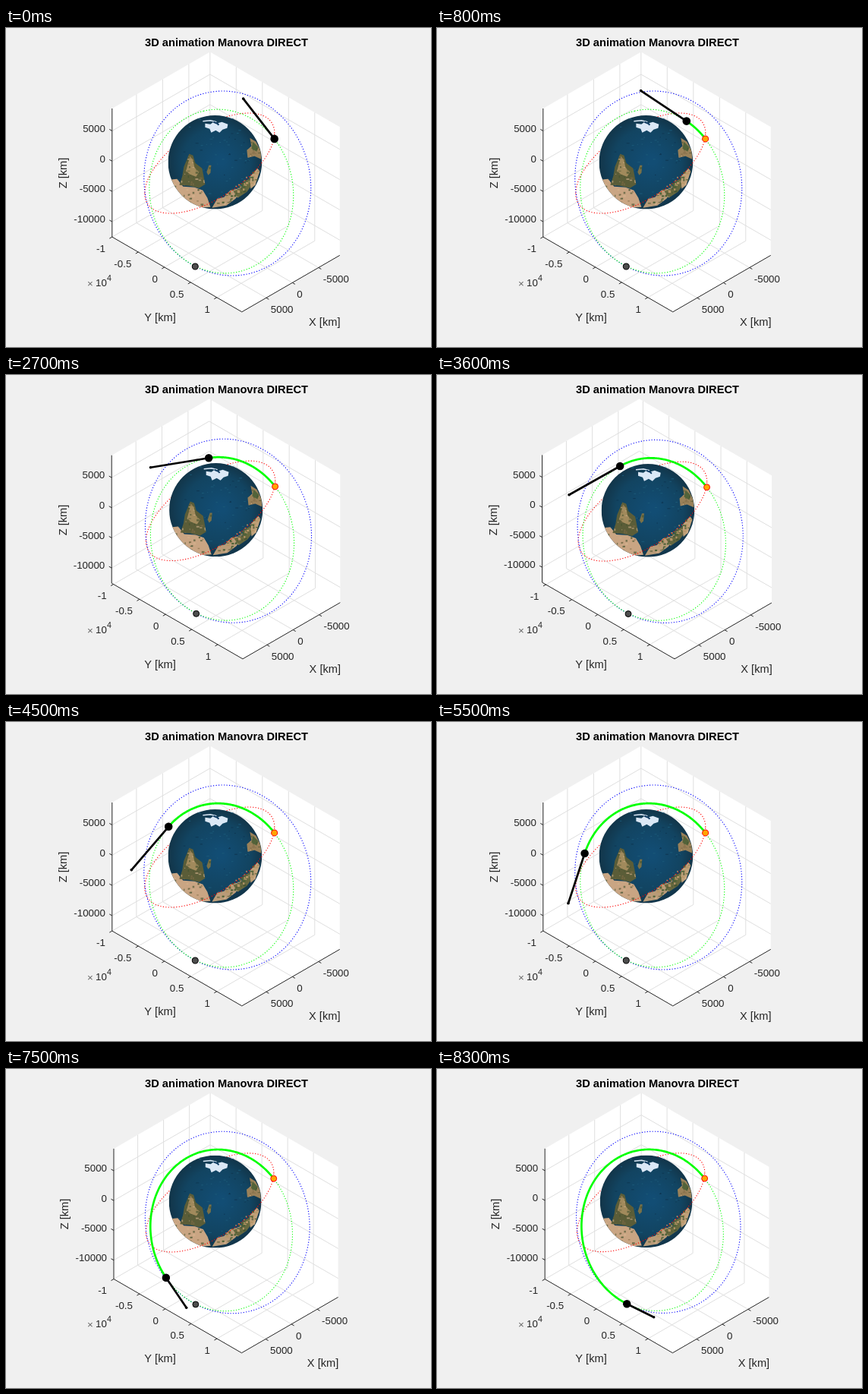
Animation, 560 px wide and 420 px high, one loop 8400 ms. Source, as an HTML page with a canvas:

```html
<!DOCTYPE html>
<html lang="en">
<head>
<meta charset="utf-8">
<title>Orbit transfer</title>
<style>
html, body { margin: 0; width: 100%; height: 100%; overflow: hidden; background: #f0f0f0; }
canvas { display: block; }
</style>
</head>
<body>
<canvas id="stage" width="560" height="420"></canvas>
<script>
const ctx = document.getElementById('stage').getContext('2d');
const TAU = Math.PI * 2, SQ2 = Math.SQRT2, SQ3 = Math.sqrt(3), SQ6 = Math.sqrt(6);
const STEPS = 84, STEP_MS = 100;
const BASE_K = 19.915;          // pixels per 5000 km along an isometric ground axis, vertically
const UNIT = BASE_K * SQ6;      // pixels per 5000 km at true length
const FONT = '"Liberation Sans", Arial, sans-serif';
const INK = '#262626';
const BOX = { x: [-1.81, 1.93], y: [-2, 2.956], z: [-2.505, 1.741] };

// Transfer orbit: screen pixels plus depth toward the viewer, Earth at the origin.
const ECC = 0.362, CENTER = [8.4, 38.3, 1.1];
const U = [-23.2, -105.8, -3], V = [-92.1, 21.2, -35.6];
const orbitPoint = E => U.map((u, i) => CENTER[i] + u * Math.cos(E) + V[i] * Math.sin(E));
const velocity = E => U.map((u, i) =>
  0.527 * (V[i] * Math.cos(E) - u * Math.sin(E)) / (1 - ECC * Math.cos(E)));
function anomaly(step) {
  const theta = (-82 + step * 2.861) * Math.PI / 180;
  return 2 * Math.atan(Math.sqrt((1 - ECC) / (1 + ECC)) * Math.tan(theta / 2));
}
function toSpace([sx, sy, d]) {
  return {
    x: (-sx / SQ2 + sy / SQ6 + d / SQ3) / UNIT,
    y: (sx / SQ2 + sy / SQ6 + d / SQ3) / UNIT,
    z: (-2 * sy / SQ6 + d / SQ3) / UNIT
  };
}

// Fit the isometric box into the plot area, growing it when the arrow leaves it.
function fitView(tip) {
  const box = {};
  for (const a of 'xyz') box[a] = [Math.min(BOX[a][0], tip[a]), Math.max(BOX[a][1], tip[a])];
  const { x, y, z } = box;
  const k = 342.3 / (x[1] - x[0] + y[1] - y[0] + 2 * (z[1] - z[0]));
  const ox = 289.8 - k * SQ3 * (y[0] + y[1] - x[0] - x[1]) / 2;
  const oy = 31.5 - k * (x[0] + y[0] - 2 * z[1]);
  const at = (px, py, pz) => [ox + k * SQ3 * (py - px), oy + k * (px + py - 2 * pz)];
  return { x, y, z, ox, oy, at, scale: k / BASE_K };
}

function path(points, close) {
  ctx.beginPath();
  points.forEach(p => ctx.lineTo(p[0], p[1]));
  if (close) ctx.closePath();
}
function line(color, width, ...points) {
  path(points);
  ctx.strokeStyle = color;
  ctx.lineWidth = width;
  ctx.stroke();
}
function dot([x, y], r, fill, edge) {
  ctx.beginPath();
  ctx.arc(x, y, r, 0, TAU);
  ctx.fillStyle = fill;
  ctx.fill();
  if (edge) { ctx.strokeStyle = edge; ctx.lineWidth = 1; ctx.stroke(); }
}
function text(str, x, y, align = 'center', size = 13.33, weight = '', color = INK) {
  ctx.font = `${weight} ${size}px ${FONT}`;
  ctx.textAlign = align;
  ctx.textBaseline = 'alphabetic';
  ctx.fillStyle = color;
  ctx.fillText(str, x, y + size * 0.36);
}

function drawAxes({ x, y, z, at }) {
  const [x0, x1] = x, [y0, y1] = y, [z0, z1] = z;
  const grid = '#dfdfdf';
  const left = at(x1, y0, z0), front = at(x1, y1, z0), right = at(x0, y1, z0);
  path([left, front, right, at(x0, y1, z1), at(x0, y0, z1), at(x1, y0, z1)], true);
  ctx.fillStyle = '#fff';
  ctx.fill();
  for (const t of [-1, 0, 1]) line(grid, 1, at(t, y1, z0), at(t, y0, z0), at(t, y0, z1));
  for (const t of [-2, -1, 0, 1, 2]) line(grid, 1, at(x1, t, z0), at(x0, t, z0), at(x0, t, z1));
  for (const t of [-2, -1, 0, 1]) line(grid, 1, at(x1, y0, t), at(x0, y0, t), at(x0, y1, t));
  line(INK, 1, at(x1, y0, z1), left, front, right);

  const tick = ([px, py], dx, dy) => line(INK, 1, [px, py], [px + dx, py + dy]);
  for (const t of [-1, 0, 1]) {
    const p = at(t, y1, z0);
    tick(p, 3.5, 2);
    text(String(t * 5000), p[0] + 6, p[1] + 15, 'left');
  }
  for (const t of [-2, -1, 0, 1, 2]) {
    const p = at(x1, t, z0);
    tick(p, -3.5, 2);
    text(String(t / 2), p[0] - 9, p[1] + 15, 'right');
  }
  for (const t of [-2, -1, 0, 1]) {
    const p = at(x1, y0, t);
    tick(p, -3.5, -2);
    text(String(t * 5000), p[0] - 9, p[1] - 3.5, 'right');
  }
  text('×', 107, 336, 'left', 13.33, '', '#666');
  text('10', 118, 335, 'left');
  text('4', 133, 329, 'left', 10.7);
  text('Y [km]', 203, 381, 'center', 14.67);
  text('X [km]', right[0] - 20, 387, 'center', 14.67);
  ctx.save();
  ctx.translate(left[0] - 65, 191);
  ctx.rotate(-Math.PI / 2);
  text('Z [km]', 0, 0, 'center', 14.67);
  ctx.restore();
  text('3D animation Manovra DIRECT', 290.5, 19, 'center', 14.67, 'bold', '#000');
}

// Land outlines, relative to the centre of the globe.
const LAND = [
  ['#c9a583', '-60,23 -50,22 -42,32 -27,33 -16,37 -10,47 -6,59 -22,60 -42,48 -54,36'],
  ['#5b5d38', '-34,-11 -29,-9 -26,1 -17,8 -15,18 -13,29 -21,34 -34,31 -47,30 -43,18 -41,6'],
  ['#a18a5c', '-33,-8 -29,-3 -27,7 -21,13 -25,19 -33,16 -38,11'],
  ['#7a7148', '-8,4 -5,4 -6,14 -9,17 -11,13'],
  ['#9a8159', '46,-32 54,-27 60,-15 61,-4 52,-8 43,-6 42,-16 48,-21'],
  ['#53633a', '50,-27 57,-20 55,-14 48,-18'],
  ['#b99b78', '-4,60 3,48 12,46 20,37 29,35 33,40 27,48 15,57'],
  ['#66683f', '24,38 35,34 39,25 45,22 50,28 42,39 30,47'],
  ['#c0a17a', '46,19 56,8 59,12 53,30 47,35']
].map(([color, pts]) => [color, pts.split(' ').map(p => p.split(',').map(Number))]);
const ICE = '-13,-51 -6,-50 -2,-53 2,-51 9,-53 17,-50 16,-45 10,-43 6,-39 1,-42 -5,-39 -7,-44 -13,-46'
  .split(' ').map(p => p.split(',').map(Number));

function makeRandom(seed) {
  return () => (seed = (seed * 16807) % 2147483647) / 2147483647;
}

function drawEarth() {
  const R = 61.8, rnd = makeRandom(77);
  ctx.save();
  ctx.beginPath();
  ctx.arc(0, 0, R, 0, TAU);
  ctx.clip();
  const sea = ctx.createRadialGradient(8, -2, 5, 0, 0, R);
  sea.addColorStop(0, '#124d74');
  sea.addColorStop(0.7, '#124461');
  sea.addColorStop(1, '#123549');
  ctx.fillStyle = sea;
  ctx.fillRect(-R, -R, 2 * R, 2 * R);
  for (let i = 0; i < 90; i++) {
    ctx.fillStyle = i % 3 ? '#1b5978' : '#0e3652';
    ctx.fillRect((rnd() - 0.5) * 120, (rnd() - 0.5) * 120, 1 + rnd() * 3, 1);
  }
  for (const [color, points] of LAND) {
    path(points, true);
    ctx.fillStyle = color;
    ctx.fill();
    // Mottled terrain inside each outline
    ctx.save();
    ctx.clip();
    const [cx, cy] = points[0];
    for (let i = 0; i < 110; i++) {
      ctx.fillStyle = ['#3f512d', '#d8b58f', '#826d48'][i % 3];
      ctx.globalAlpha = 0.6;
      ctx.fillRect(cx + (rnd() - 0.4) * 70, cy + (rnd() - 0.3) * 60, 1 + rnd() * 3, 1 + rnd() * 2);
    }
    ctx.restore();
  }
  for (let i = 0; i < 45; i++) {
    const f = rnd();
    ctx.fillStyle = i % 2 ? '#b89769' : '#4f6238';
    ctx.fillRect(8 + 46 * f + rnd() * 5, 49 - 36 * f + (rnd() - 0.5) * 12, 1 + rnd() * 3, 1 + rnd() * 2);
  }
  path(ICE, true);
  ctx.fillStyle = '#dbe8f6';
  ctx.fill();
  line('#dbe8f6', 1.5, [-16, -54], [-6, -55], [2, -53]);
  line('#0f3c63', 2, [-2, -53], [3, -51], [5, -49]);
  ctx.restore();
}

function dotted(color, points) {
  ctx.setLineDash([1.2, 2.3]);
  line(color, 1.1, ...points);
  ctx.setLineDash([]);
}
const arc = (from, to, f) =>
  Array.from({ length: 181 }, (_, i) => f(from + (to - from) * i / 180));
// Tilted ellipse from its half extents and the shear between them
const oval = (cx, cy, w, h, shear) => a =>
  [cx + w * Math.cos(a), cy - h * Math.sin(a + shear)];
const startOrbit = oval(-7.1, 1.3, 85.5, 66, Math.asin(3400 / (85.5 * 66)));
const finalOrbit = oval(16.4, 27.8, 110, 121.5, Math.asin(-740 / (110 * 121.5)));

function draw(step) {
  const E = anomaly(step), pos = orbitPoint(E);
  const tip = velocity(E).map((v, i) => pos[i] + v);
  const view = fitView(toSpace(tip));
  ctx.fillStyle = '#f0f0f0';
  ctx.fillRect(0, 0, 560, 420);
  drawAxes(view);

  ctx.save();
  ctx.translate(view.ox, view.oy);
  ctx.scale(view.scale, view.scale);
  dotted('#f00', arc(0, Math.PI, startOrbit));
  drawEarth();
  dotted('#f00', arc(Math.PI, TAU, startOrbit));
  dotted('#00f', arc(0, TAU, finalOrbit));
  dotted('#0f0', arc(0, TAU, orbitPoint));
  dot([-26.1, 137.3], 4, '#4d4d4d', '#000');
  const start = anomaly(0);
  if (step) line('#0f0', 2.7, ...arc(start, E, orbitPoint));
  dot(orbitPoint(start), 4, '#ffa500', '#f00');
  ctx.lineCap = 'round';
  line('#000', 2.7, pos, tip);
  ctx.lineCap = 'butt';
  dot(tip, 1.8, '#000');
  dot(pos, 5.3, '#000');
  ctx.restore();
}

function tick() {
  draw(Math.floor(performance.now() / STEP_MS) % STEPS);
  requestAnimationFrame(tick);
}
tick();
</script>
</body>
</html>
```
